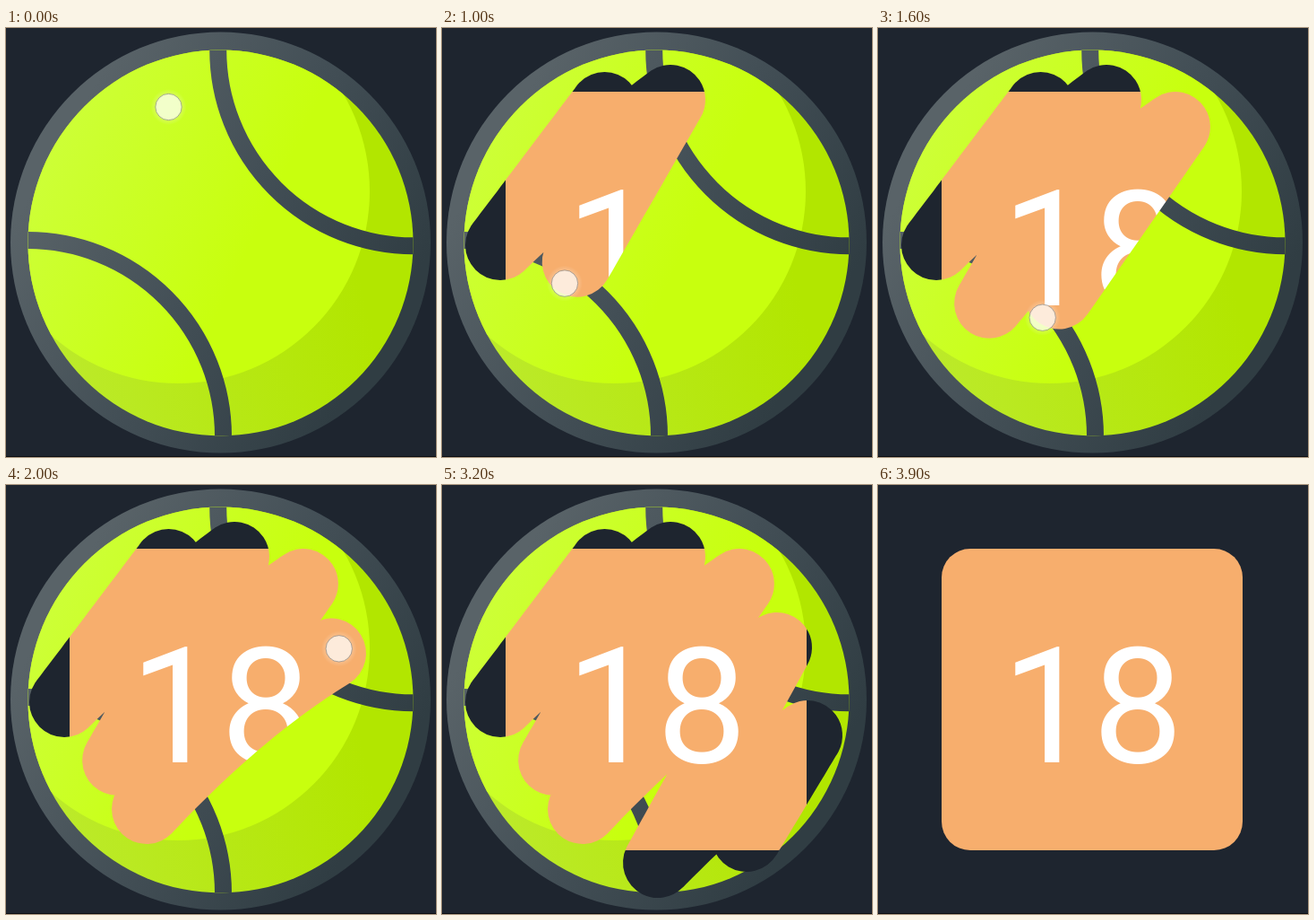
An HTML page that plays this animation: 480 by 478 pixels, repeating every 4000 ms.

```html
<!DOCTYPE html>
<html lang="en">
<head>
<meta charset="utf-8">
<title>Scratch card</title>
<style>
  html, body { margin: 0; width: 100%; height: 100%; overflow: hidden; background: #1e252f; }
  svg { display: block; }
  text { font: 180px Roboto, sans-serif; fill: #fff; text-anchor: middle; }
</style>
</head>
<body>
<svg width="480" height="478" viewBox="0 0 480 478">
  <defs>
    <linearGradient id="rim" gradientUnits="userSpaceOnUse" x1="60" y1="130" x2="420" y2="340">
      <stop offset="0" stop-color="#596368"/>
      <stop offset=".5" stop-color="#434f56"/>
      <stop offset="1" stop-color="#303d43"/>
    </linearGradient>
    <linearGradient id="felt" gradientUnits="userSpaceOnUse" x1="40" y1="130" x2="400" y2="300">
      <stop offset="0" stop-color="#cdff38"/>
      <stop offset=".65" stop-color="#c8ff0e"/>
    </linearGradient>
    <linearGradient id="shade" gradientUnits="userSpaceOnUse" x1="60" y1="380" x2="400" y2="300">
      <stop offset="0" stop-color="#bcea2a"/>
      <stop offset="1" stop-color="#b2e600"/>
    </linearGradient>
    <radialGradient id="glow">
      <stop offset=".6" stop-color="#fff" stop-opacity=".3"/>
      <stop offset="1" stop-color="#fff" stop-opacity="0"/>
    </radialGradient>
    <clipPath id="inside"><circle cx="239.5" cy="239.5" r="215"/></clipPath>
    <mask id="scratched" maskUnits="userSpaceOnUse" x="0" y="0" width="480" height="478">
      <rect width="480" height="478" fill="#fff"/>
      <path id="scratch" fill="none" stroke="#000" stroke-width="78" stroke-linecap="round" stroke-linejoin="round"/>
    </mask>
  </defs>

  <rect width="480" height="478" fill="#1e252f"/>
  <rect y="477" width="480" height="1" fill="#0b0e12"/>
  <rect x="71" y="71" width="336" height="336" rx="32" fill="#f7ae6d"/>
  <text x="239.5" y="308.5">18</text>

  <g id="ball" mask="url(#scratched)">
    <circle cx="239.5" cy="239" r="234.5" fill="url(#rim)"/>
    <g clip-path="url(#inside)">
      <rect width="480" height="478" fill="url(#shade)"/>
      <circle cx="192" cy="182" r="214" fill="url(#felt)"/>
      <g fill="none" stroke="url(#rim)" stroke-width="19">
        <circle cx="455" cy="24.5" r="218.3"/>
        <circle cx="24" cy="455" r="218.5"/>
      </g>
    </g>
  </g>

  <g id="cursor">
    <circle r="20" fill="url(#glow)"/>
    <circle r="14.7" fill="#fff" fill-opacity=".65" stroke="#808080" stroke-opacity=".65"/>
  </g>
</svg>
<script>
  const LOOP = 4000, STEP = 100, LEAD = 27, RELEASE = 3000;
  const byId = id => document.getElementById(id);
  const scratch = byId('scratch'), ball = byId('ball'), cursor = byId('cursor');

  // Turning points of the finger: time, x, y, upward bow of the stroke leading there
  const turns = [
    [100, 181.5, 88, 0], [515, 65, 242, 0], [800, 255, 80, 5],
    [1085, 124, 307, 0], [1385, 332, 110, 14], [1710, 157, 361, 0],
    [2049, 374, 181, 13], [2360, 241, 421, 0], [2673, 408, 279, 7],
    [2920, 340, 392, 0]
  ];

  function finger(t) {
    if (t <= turns[0][0]) return turns[0].slice(1, 3);
    const i = turns.findIndex(p => p[0] > t);
    if (i < 0) return turns[turns.length - 1].slice(1, 3);
    const [t0, x0, y0] = turns[i - 1], [t1, x1, y1, bow] = turns[i];
    const e = (1 - Math.cos(Math.PI * (t - t0) / (t1 - t0))) / 2;
    return [x0 + (x1 - x0) * e, y0 + (y1 - y0) * e - bow * 4 * e * (1 - e)];
  }

  function trail(end) {
    const start = turns[0][0];
    if (end < start) return '';
    const points = [];
    for (let t = start; t < end; t += 10) points.push(finger(t));
    points.push(finger(end));
    return 'M' + points.map(p => p.map(v => v.toFixed(1)).join(' ')).join('L')
      + (points.length < 2 ? 'h.01' : '');
  }

  function draw(t) {
    scratch.setAttribute('d', trail(Math.min(t, RELEASE)));
    ball.setAttribute('opacity', Math.max(0, Math.min(1, (3740 - t) / 500)));
    cursor.setAttribute('transform', `translate(${finger(t + LEAD)})`);
    cursor.setAttribute('visibility', t < RELEASE ? 'visible' : 'hidden');
  }

  const begin = performance.now();
  function tick() {
    const t = (performance.now() - begin) % LOOP;
    draw(Math.floor(t / STEP) * STEP);
    requestAnimationFrame(tick);
  }
  tick();
</script>
</body>
</html>
```
